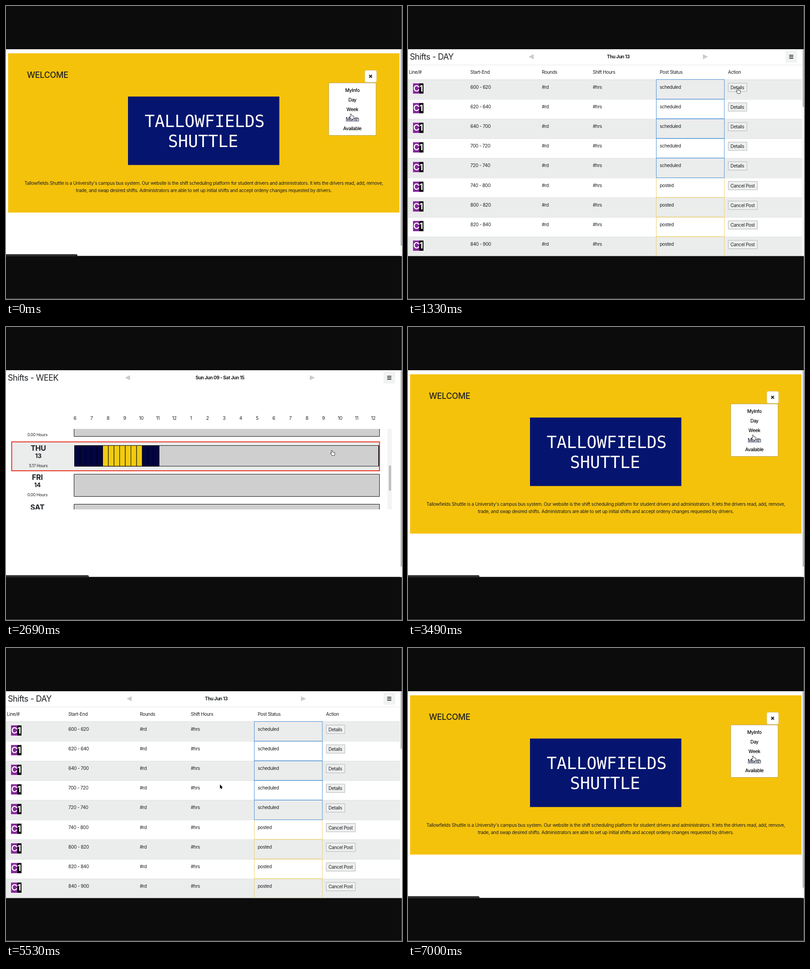
Write an HTML page with a canvas that moves like this. It is 870 px wide and 644 px high and loops after 7100 ms.

```html
<!DOCTYPE html>
<html lang="en">
<head>
<meta charset="utf-8">
<title>Shift scheduler tour</title>
<style>
  html, body { margin: 0; width: 100%; height: 100%; overflow: hidden; background: #0c0c0c; }
  canvas { display: block; }
</style>
</head>
<body>
<canvas id="stage" width="870" height="644"></canvas>
<script>
const ctx = document.getElementById('stage').getContext('2d');
const LOOP = 7100, STEP = 135;
const INK = '#1d2023', NAVY = '#020540', GOLD = '#f0cb12';
const VIEW = { top: 95, bottom: 549.5 };

// start ms, page, scroll, pointer x, pointer y, pointer mode
const KEYS = [
  [0, 'home', 0, 760, 243, 'hand'],
  [120, 'month', 0, 740, 250, 'arrow'],
  [540, 'month', 0, 590, 340, 'hand'],
  [660, 'day', 0, 590, 340, 'arrow'],
  [930, 'day', 30, 600, 290, 'arrow'],
  [1060, 'day', 58, 610, 262, 'arrow'],
  [1210, 'day', 30, 660, 230, 'arrow'],
  [1330, 'day', 0, 726, 187, 'hand'],
  [1580, 'day', 0, 726, 215, 'arrow'],
  [1880, 'day', 0, 470, 300, 'arrow'],
  [2300, 'day', 0, 802, 180, 'menu'],
  [2420, 'week', 0, 800, 200, 'arrow'],
  [2690, 'week', 240, 718, 277, 'hand'],
  [2820, 'day', 0, 700, 270, 'arrow'],
  [3210, 'home', 0, 780, 190, 'arrow'],
  [3360, 'home', 0, 801, 160, 'menu'],
  [3490, 'home', 0, 760, 243, 'hand'],
  [3640, 'month', 0, 740, 250, 'arrow'],
  [4030, 'month', 0, 590, 340, 'hand'],
  [4180, 'day', 0, 590, 340, 'arrow'],
  [4460, 'day', 30, 600, 290, 'arrow'],
  [4590, 'day', 58, 610, 262, 'arrow'],
  [4860, 'day', 0, 726, 187, 'hand'],
  [5130, 'day', 0, 726, 215, 'arrow'],
  [5400, 'day', 0, 470, 300, 'arrow'],
  [5800, 'day', 0, 802, 180, 'menu'],
  [5920, 'week', 0, 800, 200, 'arrow'],
  [6190, 'week', 240, 718, 277, 'hand'],
  [6340, 'day', 47, 506, 255, 'arrow'],
  [6580, 'day', 0, 560, 230, 'arrow'],
  [6720, 'home', 0, 780, 190, 'arrow'],
  [6850, 'home', 0, 801, 160, 'menu'],
  [7000, 'home', 0, 760, 243, 'hand']
];

function rect(x, y, w, h, fill, stroke, radius = 0, line = 1) {
  ctx.beginPath();
  ctx.roundRect(x, y, w, h, radius);
  if (fill) { ctx.fillStyle = fill; ctx.fill(); }
  if (stroke) { ctx.strokeStyle = stroke; ctx.lineWidth = line; ctx.stroke(); }
}

// y is the middle of the capitals
function text(str, x, y, { size = 10.2, weight = 400, align = 'left', color = INK,
                           gap = -0.4, family = 'Inter, sans-serif' } = {}) {
  ctx.font = `${weight} ${size}px ${family}`;
  ctx.letterSpacing = gap + 'px';
  ctx.textAlign = align;
  ctx.fillStyle = color;
  ctx.fillText(str, x, y + size * 0.36);
}

function shape(points, fill, stroke) {
  ctx.beginPath();
  points.forEach(([x, y]) => ctx.lineTo(x, y));
  ctx.closePath();
  if (stroke) { ctx.strokeStyle = stroke; ctx.lineWidth = 2; ctx.stroke(); }
  ctx.fillStyle = fill;
  ctx.fill();
}

function clipped(x, y, w, h, draw) {
  ctx.save();
  ctx.beginPath();
  ctx.rect(x, y, w, h);
  ctx.clip();
  draw();
  ctx.restore();
}

function pointer(x, y, mode) {
  ctx.save();
  ctx.translate(x, y);
  if (mode === 'arrow') {
    shape([[0, 0], [0, 9], [2, 7.2], [3.5, 10.3], [5, 9.6], [3.6, 6.7], [6.3, 6.5]], '#000', '#fff');
  } else {
    shape([[-3, -5], [-1.6, -5], [-0.6, -1.3], [3.4, -0.6], [4.2, 1], [3, 5],
           [-1.2, 5], [-4.6, 1], [-3.6, 0.2], [-2, 1.2]], '#fff', '#444');
  }
  ctx.restore();
}

function pageScroll(y, height) {
  rect(865.5, 95, 4.5, 455, '#f7f7f7');
  rect(867, y, 3, height, '#b9b9b9', null, 1.5);
}

function statusBar(width) {
  rect(-5, 545.5, width + 5, 12, '#2b2b2b', null, 3);
}

function bars(x, y) {
  for (let i = -1; i <= 1; i++) rect(x - 4.5, y + i * 3.4 - 0.7, 9, 1.5, '#111');
}

function menuButton(x, y, open, hover, fill) {
  rect(x - 12.5, y - 13, 25.5, 26, open ? '#fff' : fill, open ? '#d9d2bd' : null, 3);
  if (!open) return bars(x, y);
  ctx.beginPath();
  for (const s of [-1, 1]) {
    ctx.moveTo(x - 3, y - 3 * s);
    ctx.lineTo(x + 3, y + 3 * s);
  }
  ctx.strokeStyle = '#111';
  ctx.lineWidth = 1.9;
  ctx.stroke();
  rect(x - 92, y + 14.5, 104, 115.5, '#fff', '#b59d4e', 2);
  ['MyInfo', 'Day', 'Week', 'Month', 'Available'].forEach((item, i) => {
    const active = item === hover, cy = y + 30.5 + i * 21;
    text(item, x - 40, cy, { align: 'center', color: active ? '#10182c' : '#000', weight: 500 });
    if (active) rect(x - 54.5, cy + 4.5, 29, 1, '#2c3a5c');
  });
}

function header(title, date, center, reach, open) {
  text('Shifts - ' + title, 4, 112, { size: 18, gap: -0.5 });
  for (const side of [-1, 1]) {
    const x = center + side * reach;
    shape([[x + side * 5.5, 111.5], [x - side * 5.5, 106], [x - side * 5.5, 117]], '#c9cacb');
  }
  text(date, center, 111.5, { weight: 700, align: 'center' });
  menuButton(842, 111.5, open, 'Week', '#f1f2f2');
}

function home(_, mode) {
  rect(4.5, 104, 860, 350, '#f5c20b');
  text('WELCOME', 46, 152, { size: 18, weight: 500, gap: -0.3 });
  rect(268, 199, 332.5, 150.5, '#05156f');
  const banner = { size: 36.5, align: 'center', color: '#fff', gap: 0, family: '"DejaVu Sans Mono", monospace' };
  text('TALLOWFIELDS', 436.5, 252.5, banner);
  text('SHUTTLE', 433, 296.5, banner);
  const intro = { align: 'center', gap: -0.34 };
  text("Tallowfields Shuttle is a University's campus bus system. Our website is the shift scheduling platform for student drivers and administrators. It lets the drivers read, add, remove,", 434.5, 389, intro);
  text('trade, and swap desired shifts. Administrators are able to set up initial shifts and accept ordeny changes requested by drivers.', 434.5, 405, intro);
  menuButton(801, 154.5, mode !== 'arrow', mode === 'hand' && 'Month', '#fff');
  pageScroll(95, 432);
  if (mode === 'hand') statusBar(157);
}

function month() {
  header('MONTH', 'June', 462, 192);
  pageScroll(95, 432);
}

const clock = n => `${6 + Math.floor(n / 3)}${String(n % 3 * 20).padStart(2, '0')}`;

function shiftRow(i) {
  const y = 161.5 + i * 43.2, posted = i >= 5;
  rect(0, y, 866, 43.2, i % 2 ? '#fff' : '#ebecec');
  rect(0, y, 866, 1, '#dfe2e4');
  rect(11, y + 8.5, 14, 22.5, '#86289a');
  rect(25, y + 8.5, 9, 22.5, '#000');
  text('C', 11.5, y + 19.5, { size: 19, weight: 600, color: '#fff', gap: 0 });
  text('1', 25, y + 19.5, { size: 19, weight: 700, color: '#fff', gap: 0 });
  text(`${clock(i)} - ${clock(i + 1)}`, 137, y + 16.5);
  text('#rd', 294, y + 16.5);
  text('#hrs', 406, y + 16.5);
  text(posted ? 'posted' : 'scheduled', 553, y + 16.5);
  rect(703.5, y + 8, posted ? 64 : 41, 18.5, '#eeefef', '#b4b5b6');
  text(posted ? 'Cancel Post' : 'Details', 708.5, y + 17.5);
}

function day(scroll, mode) {
  ctx.save();
  ctx.translate(0, -scroll);
  rect(0, 129, 866, 1, '#e4e6e8');
  const columns = { 'Line/#': 2, 'Start-End': 137, 'Rounds': 294, 'Shift Hours': 406, 'Post Status': 553, 'Action': 703 };
  for (const name in columns) text(name, columns[name], 145.5);
  for (let i = 0; i < 12; i++) shiftRow(i);
  for (let i = 11; i >= 0; i--) {
    rect(545.5, 161.5 + i * 43.2, 149.5, 43.2, null, i < 5 ? '#4b92d6' : '#eed06a');
  }
  header('DAY', 'Thu Jun 13', 462, 191.5, mode === 'menu');
  ctx.restore();
  pageScroll(95 + scroll * 0.29, 127);
}

function weekRow(name, i, scroll, hover) {
  const y = 233 + i * 66 - scroll, busy = name === 'THU', shift = hover ? 2 : 0;
  if (hover) rect(12.5, y - 4.5, 808, 63.5, '#ebecec', '#e8311f', 0, 2);
  const center = { align: 'center', weight: 700 };
  text(name, 69 + shift, y + 7.5 + shift, { ...center, size: 16, gap: -0.2 });
  text(String(9 + i).padStart(2, '0'), 69 + shift, y + 24 + shift, { ...center, size: 13.5, gap: -0.2 });
  text(busy ? '5.17 Hours' : '0.00 Hours', 69 + shift, y + 46 + shift, { size: 9, align: 'center', gap: -0.3 });
  const top = hover ? y + 3.5 : y + 0.5, height = hover ? 45.5 : 49;
  rect(hover ? 150.5 : 149.5, top, hover ? 668.5 : 671, height, '#cfcfcf', '#111');
  if (!busy) return;
  rect(818, top, 1.5, height, '#000');
  for (let n = 0; n < 15; n++) {
    rect(150.5 + n * 12.4, top, 12.4, height, n > 4 && n < 12 ? GOLD : NAVY, '#000');
  }
}

function week(scroll, mode) {
  const hovering = mode === 'hand';
  header('WEEK', 'Sun Jun 09 - Sat Jun 15', 470, 203);
  for (let i = 0; i < 19; i++) {
    text(String((i + 5) % 12 + 1), 151.5 + i * 36.4, 200, { align: 'center' });
  }
  clipped(0, 224, 850, 177, () => {
    ['SUN', 'MON', 'TUE', 'WED', 'THU', 'FRI', 'SAT'].forEach((name, i) =>
      weekRow(name, i, scroll, hovering && name === 'THU'));
    rect(838, 224, 10, 177, '#f3f4f4');
    rect(841, 224 + scroll / 3, 5, 56, '#bfbfbf', null, 2.5);
  });
  pageScroll(95, 432);
  if (hovering) statusBar(182);
}

const pages = { home, month, day, week };

function stateAt(time) {
  const index = KEYS.findLastIndex(key => key[0] <= time);
  const [start, page, ...from] = KEYS[index];
  const [end, nextPage, ...to] = KEYS[index + 1] || [LOOP, ''];
  const steps = Math.max(1, Math.round((end - start) / STEP));
  const part = nextPage === page ? Math.floor((time - start) / (end - start) * steps) / steps : 0;
  const [scroll, x, y] = from.slice(0, 3).map((v, i) => part ? v + (to[i] - v) * part : v);
  return { page, scroll, x, y, mode: from[3] };
}

function frame() {
  const { page, scroll, x, y, mode } = stateAt(performance.now() % LOOP);
  rect(0, 0, 870, 644, '#0c0c0c');
  rect(0, 643, 870, 1, '#5c5c5c');
  rect(869, 0, 1, 644, '#5c5c5c');
  clipped(0, VIEW.top, 870, VIEW.bottom - VIEW.top, () => {
    rect(0, VIEW.top, 870, VIEW.bottom - VIEW.top, '#fff');
    pages[page](scroll, mode);
    pointer(x, y, mode);
  });
  requestAnimationFrame(frame);
}
requestAnimationFrame(frame);
</script>
</body>
</html>
```
